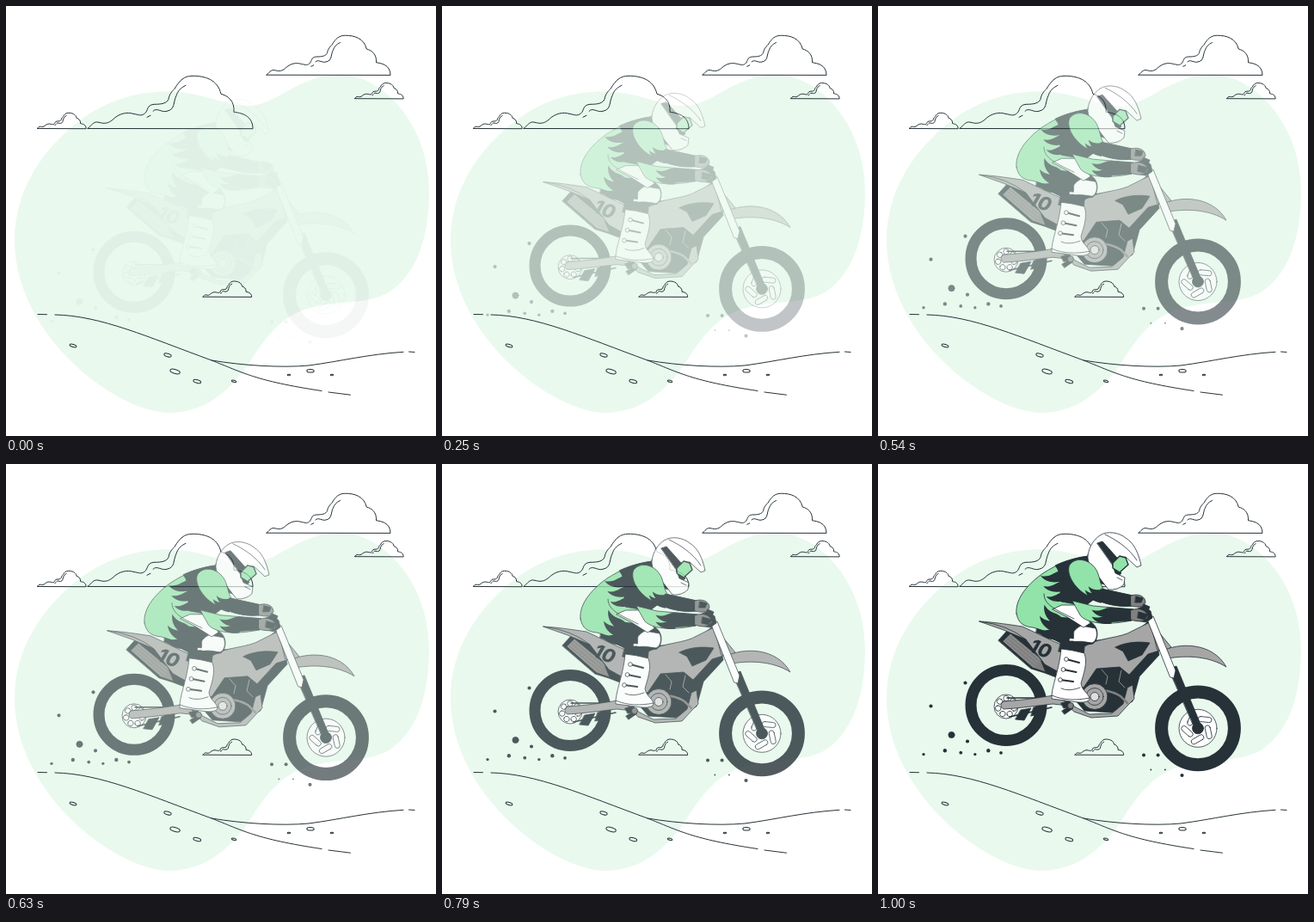
These frames come from a looping animation (500x500 px, 1040 ms). An HTML page:

```html
<!DOCTYPE html>
<html lang="en">
<head>
<meta charset="utf-8">
<title>Motocross jump</title>
<style>
  html, body { margin: 0; width: 100%; height: 100%; overflow: hidden; background: #fff; }
  svg { display: block; width: 100vw; height: 100vh; }
  .line { fill: none; stroke: #263238; stroke-linecap: round; stroke-linejoin: round; }
  #cloud path { vector-effect: non-scaling-stroke; }
  #jump { stroke: #263238; stroke-width: .8; stroke-linejoin: round; stroke-linecap: round; }
  .d { fill: #263238; }
  .g { fill: #a6a6a6; }
  .m { fill: #808080; }
  .w { fill: #fff; }
  .j { fill: #92e3a9; }
  .n { fill: none; }
  text { font: 800 22px Inter, Arial, sans-serif; fill: #263238; stroke: none; }
</style>
</head>
<body>
<svg viewBox="0 0 500 500">
  <defs>
    <g id="cloud">
      <path d="M0 0C4-2 6-9 13-7C20-5 24-6 29-10C37-18 46-19 53-17C59-16 62-14 66-17C71-21 68-27 77-28C86-28 92-29 94-34C95-40 98-43 101-46C107-56 112-61 122-61C136-61 151-57 155-40C163-38 171-32 170-19C177-18 192-16 192 0Z"/>
      <path d="M69-13l4-2M76-20C80-25 86-18 92-20C102-22 99-30 103-38C105-44 108-47 114-50"/>
    </g>
    <path id="flame" class="d" d="M2-5C-6-8-11 2-24-2C-18 7-7 8 2 6Z"/>
  </defs>

  <path fill="#e9f9ee" d="M10 272C10 215 42 165 90 130C125 105 165 97 200 100C235 103 255 116 283 116C315 115 340 80 388 80C440 80 492 140 492 215C492 265 480 310 445 333C420 347 390 342 358 350C325 357 306 380 290 404C270 436 240 473 190 473C130 473 10 385 10 272Z"/>

  <g class="line">
    <use href="#cloud" transform="translate(95 142.3)"/>
    <use href="#cloud" transform="translate(303 80) scale(.75)"/>
    <use href="#cloud" transform="translate(36.5 142.3) scale(.295)"/>
    <use href="#cloud" transform="translate(405.5 107.5) scale(.295)"/>
    <use href="#cloud" transform="translate(229 338) scale(.295)"/>
    <path d="M37 358.5L47.5 358.7M57 359C110 360 165 385 239 412C275 426 290 436 367 447.5M375 449L400.5 452.2M239 412C275 418 320 421 352 418C390 413 420 405 462 402.3M468.5 402L475 402.5"/>
    <g id="stones"></g>
  </g>

  <g id="jump">
    <path stroke-width="4.2" d="M61.5 281.5h0M101.5 254.5h0M104 322.5h0M353.5 362h0"/>
    <circle class="d" cx="85.5" cy="315" r="3.6"/>
    <g id="dust" class="d" stroke="none"></g>

    <!-- rear wheel and swing arm -->
    <circle class="n" cx="149" cy="280.5" r="41" stroke-width="13"/>
    <circle class="w" cx="149" cy="282" r="14"/>
    <g id="sprocket" class="w"></g>
    <path class="n" stroke-width="1.5" d="M150 272H200M153 294L202 283"/>
    <path class="d" d="M166 286L178 284L170 298L160 297ZM181 283L196 280L190 290L178 293Z"/>
    <path class="g" d="M146 276C165 275 195 271 215 267L222 281L203 279C185 281 165 284 146 285C142 283 142 278 146 276Z"/>

    <!-- exhaust and tail -->
    <path class="d" d="M140 205L150 194L176 204L208 232L207 248L194 243L178 238Z"/>
    <path class="m" d="M145 206L154 197L188 225L195 242L180 237Z"/>
    <g id="hatch" stroke="#a6a6a6" stroke-width=".5"></g>
    <path class="g" d="M118 183C136 184 154 187 168 189L206 207L228 216L212 243L194 233L172 204L146 193Z"/>
    <path class="n" d="M118 183Q151 187 172 204"/>
    <text transform="translate(174 217) rotate(22) skewX(-8)">10</text>

    <!-- front wheel -->
    <circle class="n" cx="372" cy="307.3" r="42.4" stroke-width="15"/>
    <circle class="w" cx="372" cy="307.3" r="22"/>
    <g id="disc" class="w"></g>
    <circle class="d" cx="372" cy="307.3" r="6.5"/>

    <!-- frame and engine -->
    <path class="d" d="M196 200L256 205L294 200L318 180L327 222L304 247L296 276L272 289L240 287L222 266L228 216Z"/>
    <path class="g" d="M216 275L232 284L246 291L272 290L285 279L290 260L296 257L298 273L291 280L279 293L248 295L228 288Z"/>
    <path class="g" d="M238 214C250 203 275 203 290 197L316 184L327 217L314 221L292 245L281 236L254 238L239 260L231 257Z"/>
    <path class="d" d="M276 213C288 207 303 206 316 208L307 222L291 229L285 218Z"/>
    <path class="n" stroke="#a6a6a6" d="M260 239L267 247L265 256M283 240L280 253L287 260"/>
    <path class="n" stroke="#808080" stroke-width="2.5" d="M246 262Q270 262 282 270L290 278"/>
    <circle class="g" cx="252" cy="270.5" r="15"/>
    <circle class="g" cx="252" cy="270.5" r="10"/>
    <circle fill="#dedede" cx="252" cy="270.5" r="5"/>
    <path class="d" d="M214 287L224 281L227 284L217 291ZM213 278L223 276L225 282L216 284Z"/>
    <circle class="m" cx="224" cy="281" r="3.5"/>

    <!-- fork and front fender -->
    <path class="g" d="M317 184L341 213L333 218L325 216Z"/>
    <path class="g" d="M329 218C350 207 389 207 405 236C386 224 361 222 337 226Z"/>
    <path class="d" d="M338 238L347 235L376 305L370 311Z"/>
    <path class="w" d="M313 180L320 177L346 240L344 249L340 248Z"/>
    <path class="d" d="M298 170L309 165L317 171L319 179L312 184L300 182Z"/>

    <!-- leg and boot -->
    <path class="d" d="M188 168L211 169L248 184C257 190 257 203 250 209L224 213L203 203L184 196Z"/>
    <path class="w" d="M222 207C222 199 230 191 236 188L253 191C256 198 254 206 249 208Q236 205 222 207Z"/>
    <path class="d" d="M213 206L227 206L240 213L239 224L210 218Z"/>
    <path class="w" d="M213 215Q225 216 240 220C244 232 239 244 236 255C237 264 246 267 246 274Q242 279 225 276L202 273C201 260 211 240 213 215Z"/>
    <path class="n" d="M202 269C216 275 231 275 246 272M213 261Q222 265 235 260"/>
    <g id="straps" class="w"></g>

    <!-- jersey -->
    <path class="j" d="M161 174C159 156 176 138 192 127C206 118 224 109 245 107L260 145L238 163L210 166L222 181L224 199C208 202 193 193 180 190C168 189 163 184 161 174Z"/>
    <path class="d" d="M245 107C230 109 216 113 206 118Q213 126 211 140L213 160L241 165L261 150Z"/>
    <path class="d" d="M228 180L210 178L203 188L206 200L227 203Z"/>
    <g id="flames" stroke="none"></g>
    <path class="w" d="M214 164L229 164Q239 170 247 185L239 190Q220 177 203 169Z"/>
    <path class="n" d="M193 151C193 164 206 169 228 180"/>

    <!-- far arm -->
    <path class="j" d="M226 159L250 165L297 169L295 182C270 187 246 187 236 177Z"/>
    <path class="d" d="M297 169L270 167L266 184L295 182Z"/>
    <g id="farFlames" stroke="none"></g>
    <path class="m" d="M294 170C304 166 312 170 314 177C311 184 302 184 294 181Z"/>
    <path class="d" d="M303 172L314 175L310 181L302 179Z"/>

    <!-- helmet -->
    <path class="d" d="M247 109L271 112L283 127L266 141L257 138Z"/>
    <path class="w" d="M244 106C246 95 251 88 258 83C267 77 281 80 288 86C298 92 303 104 306 118L301 120L288 108L278 109L272 116L276 127L287 132L286 140Q279 147 268 146L258 133C250 124 243 116 244 106Z"/>
    <path class="d" d="M255 92L261 90L278 109L272 116Z"/>
    <path class="j" stroke-width="1.4" d="M273 115L281 107L288 109L291 117L281 126L273 121Z"/>
    <path class="n" d="M264 82C277 88 292 98 301 112M278 132L284 135"/>

    <!-- near arm -->
    <path class="j" d="M222 119C228 106 250 110 256 128C259 137 259 142 263 146L296 153L295 165C270 167 247 157 235 147C226 139 220 128 222 119Z"/>
    <path class="d" d="M260 145L296 153L295 165C277 167 262 162 250 156Z"/>
    <g id="nearFlames" stroke="none"></g>
    <path class="m" d="M294 153C303 150 311 154 311 161C308 167 302 167 294 165Z"/>
    <path class="d" d="M300 154L308 156L306 161L299 161ZM309 163L316 166L314 171L307 169Z"/>
  </g>
</svg>
<script>
  const { sin, cos, PI, floor, min } = Math;
  const find = id => document.getElementById(id);
  const repeat = (n, draw) => Array.from({ length: n }, (_, i) => draw(i, i / (n - 1))).join('');
  const put = (id, n, draw) => find(id).innerHTML = repeat(n, draw);
  const dot = (x, y, r) => `<circle cx="${x}" cy="${y}" r="${r}"/>`;
  const stone = (x, y, r, turn) =>
    `<ellipse rx="${r}" ry="${r * .4}" transform="translate(${x} ${y}) rotate(${turn})"/>`;
  const flame = (x, y, turn, size) =>
    `<use href="#flame" transform="translate(${x} ${y}) rotate(${turn}) scale(${size})"/>`;

  // stones: one alone, a curved trail down the hill, a small group on the right
  find('stones').innerHTML = stone(78, 395, 4, 16)
    + repeat(4, (i, u) => stone(188 + 77 * u * u, 406 + 32 * sin(1.9 * u), 4.3 + 1.6 * sin(4.5 * u), 16))
    + repeat(3, (i, u) => stone(329 + 50 * u, 429 - 4.7 * sin(PI * u), 1.8 + 2.4 * sin(PI * u), 2));

  // dirt: a loose row behind the rear wheel, a zigzag below the front one
  find('dust').innerHTML = repeat(6, (i, u) => {
    const wave = cos(2.1 * i + .6);
    return dot(53 + 90 * u ** .8, 335.5 + 2.5 * wave, 1.9 - .3 * wave);
  }) + repeat(4, i => dot(309 + 8.3 * i, 338.5 + 17 * (i % 2), i % 2 ? .9 : 2));

  put('sprocket', 7, i => `<circle cx="149" cy="272.5" r="3.2" transform="rotate(${i * 360 / 7} 149 282)"/>`);
  put('disc', 5, i => `<rect x="-8" y="-3" width="16" height="6" rx="3"
    transform="translate(372 307.3) rotate(${i * 72 + 20}) translate(13 0) rotate(58)"/>`);
  put('hatch', 4, i => `<path d="M${146 + 2.5 * i} ${206 - 2.5 * i}l36 30"/>`);
  put('straps', 3, i => {
    const x = 219 - 3.5 * i, y = 227 + 12 * i;
    return `<path stroke-width="2" d="M${x} ${y}l15 ${4 - i}"/>` + dot(x, y, 2.4);
  });

  find('flames').innerHTML =
    repeat(3, i => flame(213 + i, 130 + 12 * i, -5, 1 - .1 * i))
    + repeat(3, i => flame(209 - i, 182 + 8 * i, 45 - 16 * i, 1));
  put('farFlames', 2, i => flame(270, 172 + 8 * i, 2, .9));
  put('nearFlames', 2, i => flame(264 - 4 * i, 152 + 4 * i, 22, .9));

  // 24 poses per second: rise while fading in, last pose held to the loop's end
  const LOOP = 1040, LAST = 24, RISE = 30;
  const jump = find('jump');
  const start = performance.now();
  function render() {
    const t = (performance.now() - start) % LOOP;
    const step = min(LAST, floor((t + 5) * 24 / 1000));
    const p = (step + 1) / (LAST + 1);
    jump.setAttribute('transform', `translate(0 ${RISE * (1 - p)})`);
    jump.setAttribute('opacity', p);
    requestAnimationFrame(render);
  }
  render();
</script>
</body>
</html>
```
